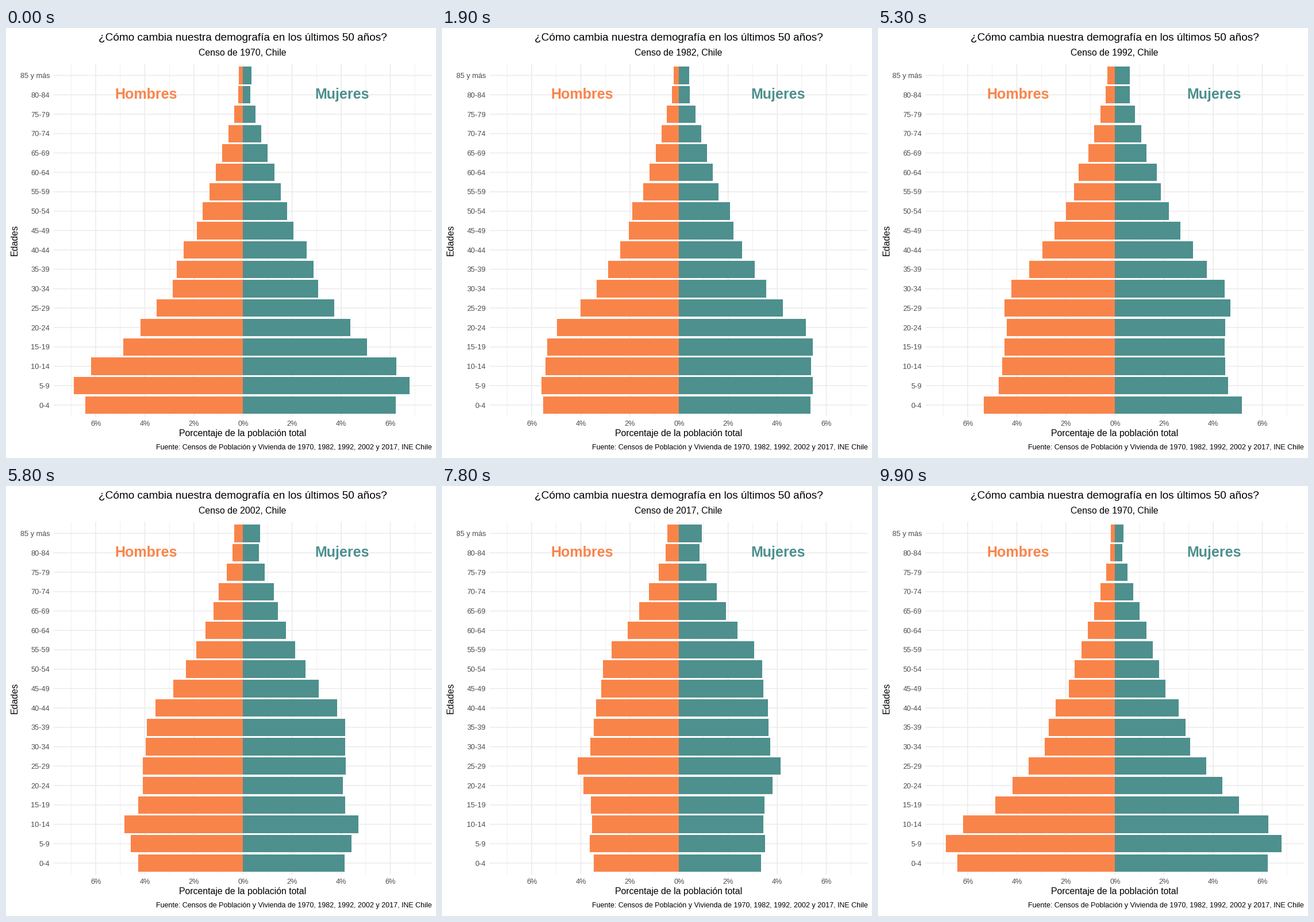
Recreate the animation shown at these times as a matplotlib script. Size 748 by 748 pixels, loop 10 s.

```python
import numpy as np
import matplotlib.pyplot as plt
from matplotlib.animation import FuncAnimation
from matplotlib.patches import Rectangle

SIZE, DPI = 748, 64
PT = 72 / DPI  # points per pixel
ZERO, UNIT = 412.3, 42.7  # x of 0 %, pixels per percent
TOP, STEP = 82.5, 33.73  # y of the oldest group, row pitch
LEFT, RIGHT = 82.5, 740.7
UPPER, LOWER = 62.2, 676.2
ORANGE, TEAL, GRID, GREY = "#F9844A", "#4D908E", "#EBEBEB", "#4D4D4D"

GROUPS = 18
LABELS = [f"{a}-{a + 4}" for a in range(0, 85, 5)] + ["85 y más"]
ROWS = [TOP + STEP * (GROUPS - 1 - i) for i in range(GROUPS)]

# Total population in thousands at each census
POPULATION = {1970: 8885, 1982: 11330, 1992: 13348, 2002: 15116, 2017: 17574}
YEARS = list(POPULATION)

# Boys per five-year birth cohort, in thousands, at turning points
BIRTHS = [(1885, 40), (1888, 44), (1910, 131), (1924, 185), (1929, 241),
          (1937, 255), (1949, 391), (1954, 457), (1958, 567), (1964, 630),
          (1967.5, 571), (1970, 613), (1980, 611), (1985, 644),
          (1989.5, 742), (1995, 681), (2000, 609), (2005, 585),
          (2010, 616), (2015, 590)]

FRAMES, INTERVAL = 100, 100
STARTS = [14, 34, 53, 73, 93]  # first frame of each transition
MOVE = 7  # frames per transition


def pyramid(year):
    """Age each birth cohort to the census; return men and women in percent."""
    age = 2.5 + 5 * np.arange(GROUPS + 1)
    boys = np.interp(year - age, *zip(*BIRTHS))
    hazard = 0.94 * np.exp((age - 82.5) / 13.1)  # Gompertz mortality
    turn = 13 + 0.4 * (year - 1970)  # age at which women outnumber men
    ratio = 1.01 + 0.045 * np.tanh((age - turn) / 8)
    both = np.array([boys * np.exp(-hazard),
                     boys * ratio * np.exp(-0.6 * hazard)])
    both[:, -2] += both[:, -1]  # open-ended oldest group
    return 100 * both[:, :GROUPS] / POPULATION[year]


PYRAMIDS = [pyramid(year) for year in YEARS]

plt.rcParams["font.family"] = "Liberation Sans"
fig = plt.figure(figsize=(SIZE / DPI, SIZE / DPI), dpi=DPI, facecolor="white")
ax = fig.add_axes([0, 0, 1, 1])
ax.set(xlim=(0, SIZE), ylim=(SIZE, 0))
ax.axis("off")


def label(x, y, text, px, color="black", ha="center", **kw):
    return ax.text(x, y, text, fontsize=px * PT, color=color, ha=ha,
                   va="baseline", zorder=4, **kw)


def line(xs, ys, px):
    ax.plot(xs, ys, color=GRID, lw=px * PT, solid_capstyle="butt",
            snap=False, zorder=1)


def bars(color):
    return [ax.add_patch(Rectangle((ZERO, y - 0.45 * STEP), 0, 0.9 * STEP,
                                   fc=color, lw=0, snap=True, zorder=3))
            for y in ROWS]


for pct in range(-7, 8):
    x = ZERO + pct * UNIT
    line([x, x], [UPPER, LOWER], 0.78 if pct % 2 else 1.55)
    if pct % 2 == 0:
        label(x, 692.5, f"{abs(pct)}%", 12.8, GREY)

for text, y in zip(LABELS, ROWS):
    line([LEFT, RIGHT], [y, y], 1.55)
    label(76.2, y + 4.6, text, 12.8, GREY, ha="right")

label(411.6, 22, "¿Cómo cambia nuestra demografía en los últimos 50 años?", 19)
subtitle = label(411.6, 48.3, "", 15.9)
label(411.6, 710, "Porcentaje de la población total", 15.9)
label(740.5, 733.3, "Fuente: Censos de Población y Vivienda de 1970, 1982, "
      "1992, 2002 y 2017, INE Chile", 12.45, ha="right")
label(19.4, 368.7, "Edades", 16, rotation=90, rotation_mode="anchor")
label(243.5, 122.8, "Hombres", 25, ORANGE, weight="bold")
label(584.5, 122.8, "Mujeres", 25, TEAL, weight="bold")

men_bars, women_bars = bars(ORANGE), bars(TEAL)


def progress(frame):
    """Return the two censuses being blended and the linear mix."""
    begun = sum(s <= frame for s in STARTS)
    if begun == 0:
        return 0, 0, 0
    t = min((frame - STARTS[begun - 1] + 1) / MOVE, 1)
    return begun - 1, begun % len(YEARS), t


def draw(frame):
    a, b, t = progress(frame)
    men, women = UNIT * (PYRAMIDS[a] * (1 - t) + PYRAMIDS[b] * t)
    for left, right, m, w in zip(men_bars, women_bars, men, women):
        left.set_width(-m)
        right.set_width(w)
    subtitle.set_text(f"Censo de {YEARS[b if t > 0.5 else a]}, Chile")
    return [*men_bars, *women_bars, subtitle]


anim = FuncAnimation(fig, draw, frames=FRAMES, interval=INTERVAL,
                     repeat=True, repeat_delay=0, blit=False)
plt.show()
```
